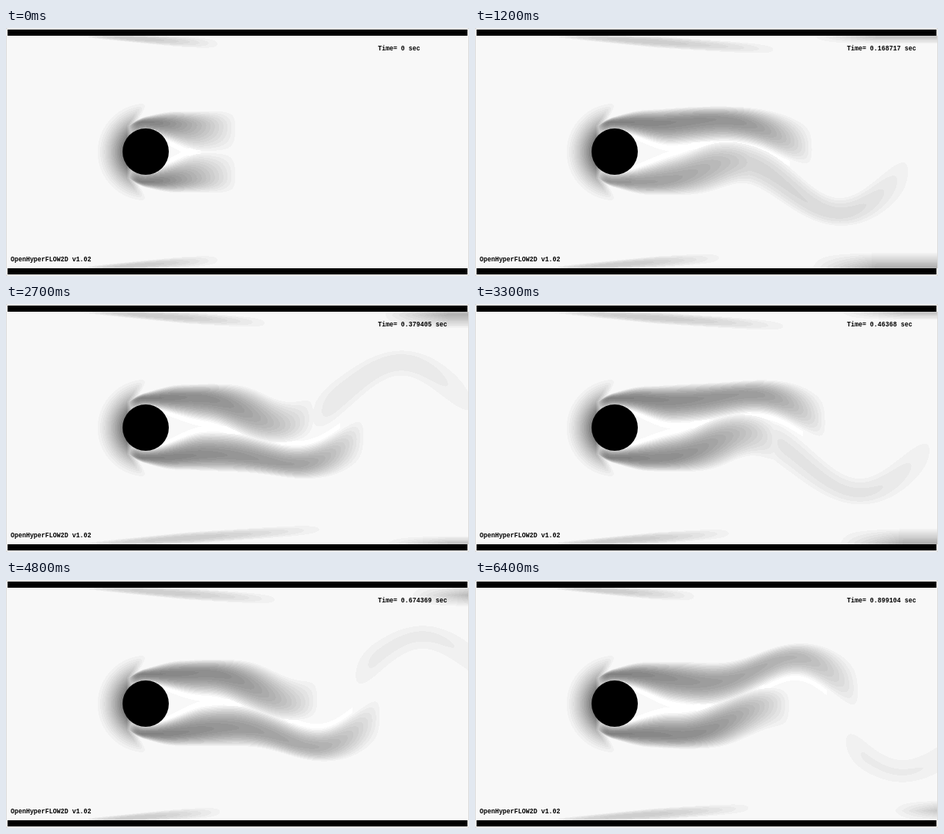
Write an HTML page with a canvas that moves like this. It is 600 px wide and 321 px high and loops after 6.5 s.

```html
<!DOCTYPE html>
<html lang="en">
<head>
<meta charset="utf-8">
<title>Flow past a cylinder</title>
<style>
html, body { margin: 0; width: 100%; height: 100%; overflow: hidden; background: #f8f8f8; }
canvas { position: absolute; left: 0; top: 0; }
p {
  position: absolute; margin: 0; white-space: pre; color: #000;
  font: bold 8.3px/10px "Liberation Mono", monospace;
}
#clock { left: 482px; top: 22px; }
#label { left: 6px; top: 295px; }
</style>
</head>
<body>
<canvas id="stage" width="600" height="321"></canvas>
<p id="clock">Time= 0 sec</p>
<p id="label">OpenHyperFLOW2D v1.02</p>
<script>
const W = 600, H = 321, MID = 160;
const STEP = 100, STEPS = 65, SHEDDING = 11;
const CYL = { x: 181, y: 160, r: 30 };
const BACKGROUND = 248, BAND = 7;

const ctx = document.getElementById('stage').getContext('2d');
const clock = document.getElementById('clock');
const image = ctx.createImageData(W, H);

const clamp = v => Math.min(1, Math.max(0, v));
const mix = (a, b, t) => a + (b - a) * t;
const smooth = (a, b, v) => {
  const t = clamp((v - a) / (b - a));
  return t * t * (3 - 2 * t);
};

// Where a lobe's crest and front lie after s shedding periods.
const crestX = s => 350 + 265 * s + 45 * s * s;
const frontX = s => 457 + 205 * s + 190 * s * s;
// Phase of the sideways swing, in periods.
const swingAge = x => (Math.sqrt(290 * 290 - 180 * (334 - x)) - 290) / 90;
const strength = x => 12 + 100 / (1 + Math.exp((x - 415) / 38));

function lobe(x, s) {
  const xc = crestX(s), xf = frontX(s), a = strength(xc);
  const born = smooth(-0.85, -0.5, s);
  if (x >= xf) return 0;
  if (x > xc) return born * a * (1 - ((x - xc) / (xf - xc)) ** 2);
  const tail = 455 + 580 * (s - 0.68);
  const loose = a * smooth(tail, tail + 50, x);
  const attached = mix(a, 120, clamp((xc - x) / Math.max(xc - 200, 1)));
  return born * mix(attached, loose, smooth(0.18, 0.5, s));
}

function centre(x, age, n, growth) {
  if (x < CYL.x) return MID - Math.sqrt(Math.max(0, 39 * 39 - (x - CYL.x) ** 2));
  if (n === 0) return 121 + 0.06 * (x - CYL.x);
  const base = 121 + 14 * Math.exp(-(((x - 355) / 70) ** 2));
  const swing = 50 * growth * smooth(190, 560, x);
  return base - swing * Math.cos(2 * Math.PI * (swingAge(x) - age));
}

// One column of the upper shear layer; the lower one is its mirror, half a period off.
function column(x, age, n) {
  const growth = smooth(0, 9, n);
  const yc = centre(x, age, n, growth);
  const slope = (centre(x + 1, age, n, growth) - centre(x - 1, age, n, growth)) / 2;
  const tilt = Math.sqrt(1 + slope * slope);
  const wave = growth * Math.cos(2 * Math.PI * (swingAge(Math.max(x, 150)) - age));
  const far = smooth(210, 330, x);
  const outer = mix(17, 26 - 8 * wave, far) * mix(0.1, 1, smooth(150, 225, x));
  const inner = mix(n ? 30 : 36, 24, smooth(290, 380, x)) * mix(0.42, 1, smooth(178, 258, x));
  const end = 302 + 250 * n;
  const steady = 120 * (1 - clamp((x - 190) / (end - 190)) ** 1.3);
  const shed = Math.max(lobe(x, age - 1), lobe(x, age), lobe(x, age + 1));

  const wallAge = age < 0.1 ? age : age - 1;
  const wallEnd = n === 0 ? 285 : 418 + 150 * wallAge;
  const u = (x - 88) / (wallEnd - 88);
  let wallDark = 0, wallHeight = 20, wallY = 11;
  if (n > 0) {
    if (age > 0.3 && age < 0.85) {
      wallDark = 75 * clamp((x - 465 - 390 * (age - 0.5)) / 90);
      wallY += 60 * Math.max(0, age - 0.5);
      wallHeight = 20 - 30 * Math.max(0, age - 0.5);
    } else if (wallAge > -0.2) {
      wallDark = 55 * clamp((x - 465 - 390 * wallAge) / 90);
      wallHeight = 10;
    }
  }
  return {
    yc,
    dark: smooth(148, 172, x) * mix(steady, shed, growth),
    outer: outer * tilt,
    inner: inner * tilt,
    streak: u > 0 && u < 1 ? 48 * Math.sin(Math.PI * u ** 0.8) : 0,
    streakY: 8 + 0.066 * (x - 90),
    streakSize: Math.min(8, 3 + 0.035 * Math.max(0, x - 90)),
    wallDark, wallHeight, wallY
  };
}

function layer(c, y) {
  const t = y < c.yc ? (c.yc - y) / c.outer : (y - c.yc) / c.inner;
  let v = 0;
  if (t < 1) v = c.dark * (1 - t * t) ** 1.2;
  else if (y > c.yc && t < 1.25 && c.dark > 50) v = -BAND;
  if (y < 45) {
    v = Math.max(v, c.streak * (1 - ((y - c.streakY) / c.streakSize) ** 2),
      c.wallDark * (1 - Math.abs(y - c.wallY) / c.wallHeight));
  }
  return v;
}

// Compression ahead of the cylinder, cut off by a slanted edge.
function halo(x, y) {
  const reach = 69 - Math.hypot(x - CYL.x, y - MID);
  if (x > 190 || reach <= 0) return 0;
  const edge = Math.max(166, 184 - 0.72 * (y - 101));
  return 130 * Math.min(1, reach / 39) ** 1.6 * clamp((edge - x) / 10);
}

function draw(n) {
  const age = (SHEDDING - n % SHEDDING) % SHEDDING / SHEDDING;
  const opposite = (age + 0.5) % 1;
  for (let x = 0; x < W; x++) {
    const top = column(x, age, n);
    const bottom = column(x, opposite, n);
    for (let y = 0; y < H; y++) {
      const mirror = 2 * MID - y;
      const a = layer(top, y), b = layer(bottom, mirror);
      let v = Math.max(a, b, halo(x, Math.min(y, mirror)));
      if (v < BAND) v = Math.min(a, b, 0);
      const gray = BACKGROUND - Math.floor(v / BAND) * BAND;
      const i = 4 * (y * W + x);
      image.data[i] = image.data[i + 1] = image.data[i + 2] = gray;
      image.data[i + 3] = 255;
    }
  }
  ctx.putImageData(image, 0, 0);

  ctx.strokeStyle = '#fff';
  ctx.setLineDash([2, 2]);
  ctx.beginPath();
  ctx.arc(CYL.x, CYL.y, CYL.r + 0.5, -1.2, 1.2);
  ctx.stroke();
  ctx.setLineDash([]);
  ctx.fillStyle = '#000';
  ctx.beginPath();
  ctx.arc(CYL.x, CYL.y, CYL.r, 0, 2 * Math.PI);
  ctx.fill();
  ctx.fillStyle = '#f8f8f8';
  ctx.fillRect(0, 0, W, 10);
  ctx.fillRect(0, 311, W, 10);
  ctx.strokeStyle = '#dcdcdc';
  ctx.strokeRect(0.5, 0.5, W - 1, H - 1);
  ctx.fillStyle = '#000';
  ctx.fillRect(2, 2, W - 4, 8);
  ctx.fillRect(2, 311, W - 4, 8);

  const seconds = n ? 0.014045904 * n + 0.00016566 : 0;
  clock.textContent = `Time= ${Number(seconds.toPrecision(6))} sec`;
}

let shown = -1;
function tick() {
  const n = Math.floor(performance.now() / STEP) % STEPS;
  if (n !== shown) draw(shown = n);
  requestAnimationFrame(tick);
}
tick();
</script>
</body>
</html>
```
